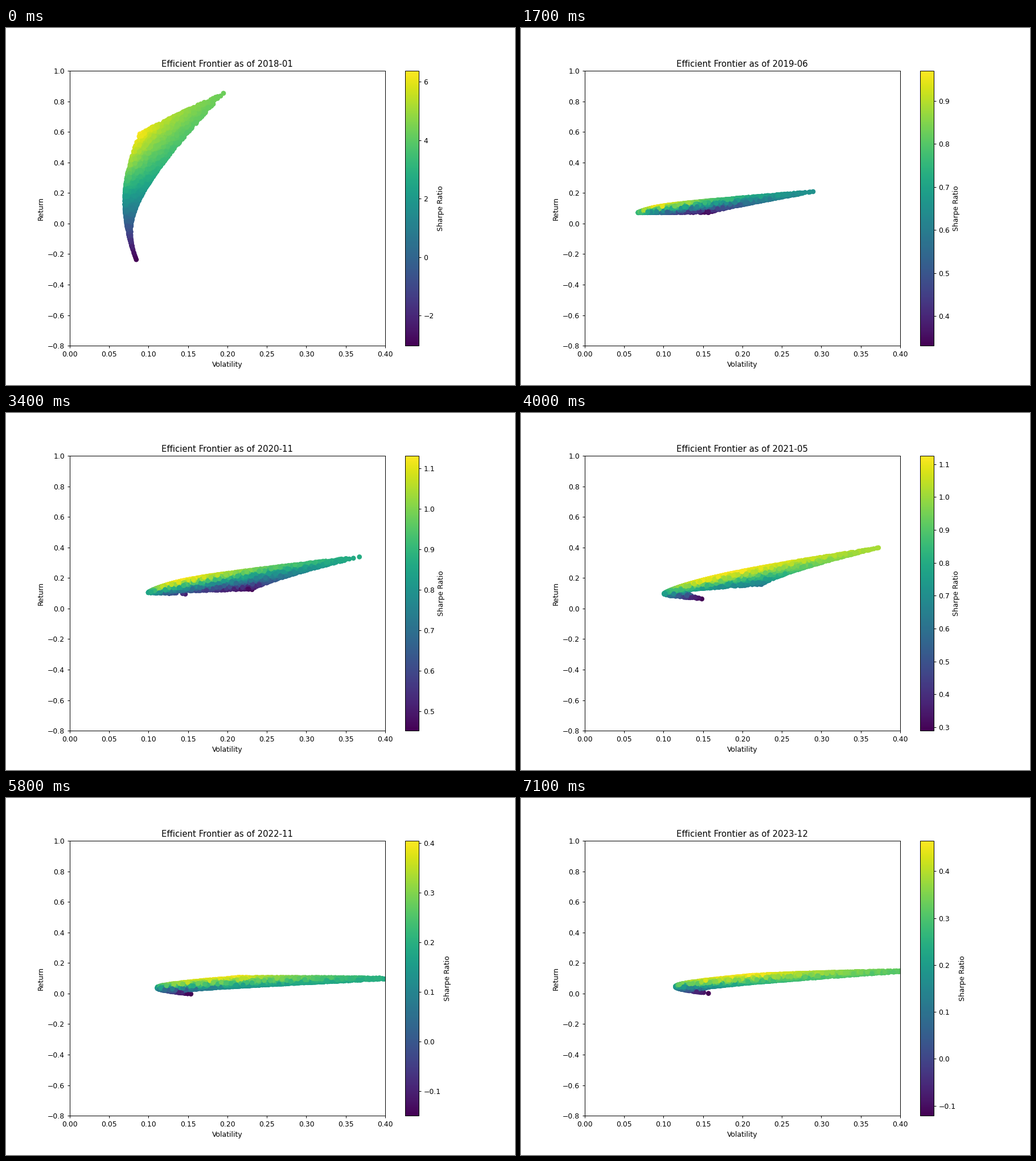
Write a matplotlib script that moves like this. It is 894x626 px and loops after 7200 ms.

```python
import numpy as np
import matplotlib.pyplot as plt
from matplotlib.animation import FuncAnimation

WIDTH, HEIGHT, DPI = 894, 626, 89.4
MONTHS = 72
PORTFOLIOS = 10000
RISK_FREE = 0.02

# Yearly mean return since the start, at a few turning points
KEY_MONTHS = np.array([1, 7, 12, 18, 28, 41, 59, 72])
BOND = [-0.236, -0.049, -0.01, 0.071, 0.149, 0.063, -0.003, 0.001]
INDEX = [0.587, 0.097, -0.03, 0.072, 0.067, 0.158, 0.107, 0.119]
GROWTH = [0.853, 0.274, 0.07, 0.209, 0.236, 0.398, 0.103, 0.157]


def ease(month, middle, width):
    return 1 / (1 + np.exp((middle - month) / width))


def mean_returns(month):
    """Interpolate the running totals, then turn them back into means."""
    return np.array([np.interp(month, KEY_MONTHS, KEY_MONTHS * means) / month
                     for means in (BOND, INDEX, GROWTH)])


def volatilities(month):
    """Slow growth plus jumps in late 2018, March 2020 and 2022."""
    crash = ease(month, 26.6, 0.15)
    calm = np.exp((28 - month) / 13)
    bond = 0.0805 + 0.004 * np.sqrt(month) + 0.0425 * crash
    index = (0.157 - 0.068 * np.exp(2 - 2 * month)
             + crash * (0.055 + 0.033 * calm))
    growth = (0.195 + 0.0265 * np.log(month) + 0.018 * ease(month, 11, 0.5)
              + 0.06 * crash + 0.055 * ease(month, 51, 2.5))
    return np.array([bond, index, growth])


def covariance(month):
    bond_index = (-0.38 + 0.82 * np.exp(-month / 5.4)
                  + 0.21 * ease(month, 53, 6))
    bond_growth = (-0.31 + 0.35 * np.exp(-month / 8)
                   + 0.28 * ease(month, 43, 8))
    index_growth = 0.92 - 0.0025 * month
    corr = np.array([[1, bond_index, bond_growth],
                     [bond_index, 1, index_growth],
                     [bond_growth, index_growth, 1]])
    vols = volatilities(month)
    return corr * np.outer(vols, vols)


def portfolios(month):
    rng = np.random.default_rng(100 + month)
    weights = rng.random((PORTFOLIOS, 3))
    weights /= weights.sum(axis=1, keepdims=True)
    weights[:3] = np.eye(3)  # each asset on its own
    returns = weights @ mean_returns(month)
    vols = np.sqrt(np.sum((weights @ covariance(month)) * weights, axis=1))
    return vols, returns, (returns - RISK_FREE) / vols


# The tiny margin keeps the pixel size from being truncated
size = ((WIDTH + 1e-6) / DPI, (HEIGHT + 1e-6) / DPI)
fig, ax = plt.subplots(figsize=size, dpi=DPI)
vols, returns, sharpe = portfolios(1)
cloud = ax.scatter(vols, returns, c=sharpe, cmap="viridis")
fig.colorbar(cloud, ax=ax, label="Sharpe Ratio")
ax.set(xlim=(0, 0.4), ylim=(-0.8, 1.0), xlabel="Volatility", ylabel="Return")


def update(i):
    vols, returns, sharpe = portfolios(i + 1)
    cloud.set_offsets(np.column_stack([vols, returns]))
    cloud.set_array(sharpe)
    cloud.set_clim(sharpe.min(), sharpe.max())
    ax.set_title(f"Efficient Frontier as of {2018 + i // 12}-{i % 12 + 1:02d}")
    return [cloud]


def init():
    return update(0)


anim = FuncAnimation(fig, update, frames=MONTHS, init_func=init,
                     interval=100, repeat=True, repeat_delay=0)
plt.show()
```
